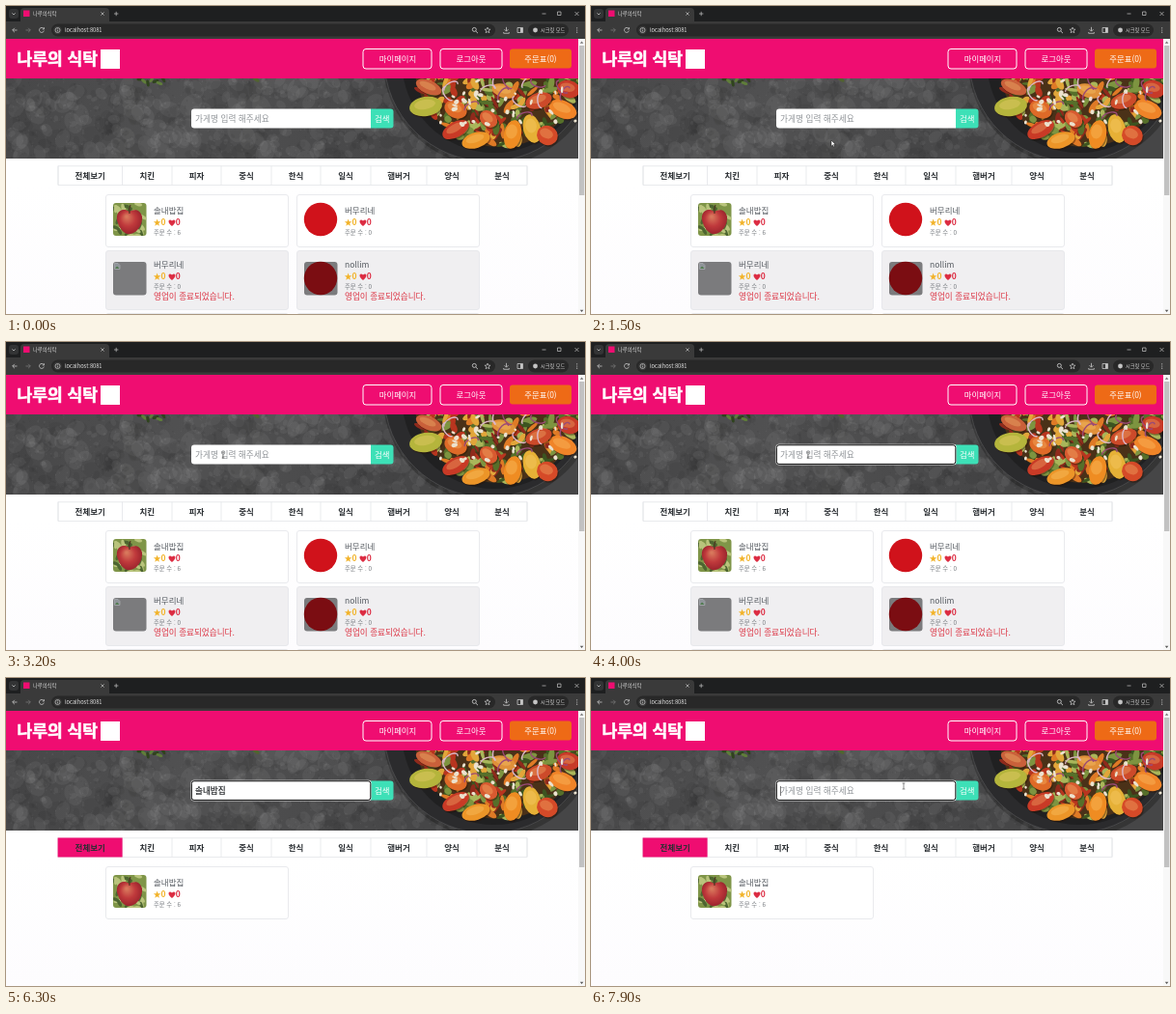
Animation, 600 px wide and 319 px high, one loop 8 s. Source, as an HTML page with a canvas:

```html
<!DOCTYPE html>
<html lang="ko">
<head>
<meta charset="utf-8">
<title>나루의식탁</title>
<style>
html, body { margin: 0; width: 100%; height: 100%; overflow: hidden; background: #fff; }
canvas, svg { position: absolute; left: 0; top: 0; width: 600px; height: 319px; }
text { font-family: "Noto Sans CJK KR", "Noto Sans CJK", "Noto Sans", sans-serif; white-space: pre; }
</style>
</head>
<body>
<canvas id="page"></canvas>
<svg id="over" viewBox="0 0 600 319"></svg>
<script>
const W = 600, H = 319, LOOP = 8000;
const PINK = '#ef0d71', LINE = '#e4e5e9';
const canvas = document.getElementById('page');
const svg = document.getElementById('over');
const c = canvas.getContext('2d');
const dpr = window.devicePixelRatio || 1;
canvas.width = W * dpr;
canvas.height = H * dpr;
c.scale(dpr, dpr);

// ---------- helpers ----------
function rect(x, y, w, h, fill) { c.fillStyle = fill; c.fillRect(x, y, w, h); }

function box(x, y, w, h, r, fill, stroke, lw = 1) {
  c.beginPath();
  c.roundRect(x, y, w, h, r);
  if (fill) { c.fillStyle = fill; c.fill(); }
  if (stroke) { c.strokeStyle = stroke; c.lineWidth = lw; c.stroke(); }
}

function oval(x, y, rx, ry, fill, turn = 0) {
  c.beginPath();
  c.ellipse(x, y, rx, ry, turn, 0, Math.PI * 2);
  c.fillStyle = fill;
  c.fill();
}

function path(d, stroke, lw = 1, fill) {
  const p = new Path2D(d);
  if (fill) { c.fillStyle = fill; c.fill(p); }
  if (stroke) { c.strokeStyle = stroke; c.lineWidth = lw; c.stroke(p); }
}

function clipped(x, y, w, h, r, paint) {
  c.save();
  c.beginPath();
  c.roundRect(x, y, w, h, r);
  c.clip();
  paint();
  c.restore();
}

function random(seed) {
  return () => (seed = (seed * 16807) % 2147483647) / 2147483647;
}

function add(tag, attrs, parent = svg) {
  const el = document.createElementNS('http://www.w3.org/2000/svg', tag);
  for (const k in attrs) el.setAttribute(k, attrs[k]);
  parent.appendChild(el);
  return el;
}

// cy is the middle of the line
function label(str, x, cy, size, fill, opt = {}, parent = svg) {
  const el = add('text', { x, y: cy + size * 0.36, 'font-size': size, fill, ...opt }, parent);
  el.textContent = str;
  return el;
}

const MID = { 'text-anchor': 'middle' };
const BOLD = { 'font-weight': 700 };
const show = (el, on) => el.setAttribute('visibility', on ? 'visible' : 'hidden');

// ---------- browser frame ----------
function drawBrowser() {
  const ink = '#c4c4c4';
  rect(0, 0, W, 17, '#1e1f20');
  rect(0, 16, W, 18, '#3a3a3a');
  box(15, 2, 92, 15, [4, 4, 0, 0], '#3a3a3a');
  box(3, 3, 10, 10, 3, '#333435');
  path('M6.4 7.4L8 9L9.6 7.4', ink, 0.8);
  rect(18, 4.5, 6.5, 6.5, PINK);
  path('M98.4 6.4L101.6 9.6M101.6 6.4L98.4 9.6M112 8H116.4M114.2 5.8V10.2', ink, 0.7);
  path('M555.5 8H559.5M589.5 6L593.5 10M593.5 6L589.5 10M571.5 6H575V9.5H571.5Z', ink, 0.7);

  path('M11.5 25H6.8M8.9 22.8L6.7 25L8.9 27.2', ink, 0.8);
  path('M20.5 25H25.2M23.1 22.8L25.3 25L23.1 27.2', '#777', 0.8);
  path('M39 23.4A2.5 2.5 0 1 0 39.4 25.6M39.5 22.2V24H37.7', ink, 0.8);
  box(47, 18.5, 460, 13, 6.5, '#282828');
  oval(53.5, 25, 4.2, 4.2, '#3a3a3a');
  c.beginPath();
  c.arc(53.5, 25, 2.5, 0, Math.PI * 2);
  c.strokeStyle = ink;
  c.lineWidth = 0.7;
  c.stroke();
  path('M53.5 24.6V26.4M53.5 23.4V24', ink, 0.7);
  path('M487.3 24.4A2 2 0 1 1 483.3 24.4A2 2 0 1 1 487.3 24.4M486.8 26L489 28.2', ink, 0.9);
  star(499, 25.2, 3.2, null, ink);
  path('M518.5 21.8V26M516.5 24.2L518.5 26.2L520.5 24.2M515.7 27V28.3H521.3V27', ink, 0.8);
  path('M530 22.5H535.5V27.5H530Z', ink, 0.8);
  rect(533, 22.5, 2.5, 5, ink);
  box(541, 18.5, 42, 13, 6.5, '#282828');
  oval(548.5, 25, 2.4, 2.4, ink);
  for (const y of [22.8, 25, 27.2]) oval(591.7, y, 0.6, 0.6, ink);
}

function star(x, y, r, fill, stroke) {
  c.beginPath();
  for (let i = 0; i < 10; i++) {
    const a = i * Math.PI / 5 - Math.PI / 2, q = i % 2 ? r * 0.42 : r;
    c.lineTo(x + q * Math.cos(a), y + q * Math.sin(a));
  }
  c.closePath();
  if (fill) { c.fillStyle = fill; c.fill(); }
  if (stroke) { c.strokeStyle = stroke; c.lineWidth = 0.7; c.stroke(); }
}

function heart(x, y) {
  path(`M${x} ${y + 3.4}C${x - 6} ${y - 0.6} ${x - 3} ${y - 5} ${x} ${y - 1.9}` +
       `C${x + 3} ${y - 5} ${x + 6} ${y - 0.6} ${x} ${y + 3.4}Z`, null, 0, '#dc2c42');
}

// ---------- page ----------
function drawHeader() {
  rect(0, 34, 593, 41, PINK);
  rect(98, 45, 20, 20, '#fff');
  box(370, 44.5, 71, 20.5, 3, null, '#fff', 1);
  box(450, 44.5, 64, 20.5, 3, null, '#fff', 1);
  box(522, 44.5, 64, 20, 3, '#ee6a16');
}

function drawHero() {
  const rnd = random(77);
  clipped(0, 75, 593, 83, 0, () => {
    const g = c.createLinearGradient(0, 75, 420, 158);
    g.addColorStop(0, '#474748');
    g.addColorStop(0.45, '#515152');
    g.addColorStop(1, '#464647');
    rect(0, 75, 593, 83, g);
    for (let i = 0; i < 1500; i++) {
      const tone = rnd() < 0.5 ? '255,255,255' : '0,0,0';
      const r = 0.6 + 9 * rnd() ** 6;
      oval(rnd() * 480, 75 + rnd() * 83, r * 1.4, r, `rgba(${tone},0.05)`, rnd() * 3);
    }
    for (let i = 0; i < 7; i++) {
      oval(139 + i * 4, 76 + (i % 3) * 2, 3.5, 1.6, i % 2 ? '#5f7d3a' : '#2f431d', i * 0.7);
    }
    oval(259, 76, 4, 1.8, '#506530', 0.6);
    drawPlate(rnd);
  });
}

function drawPlate(rnd) {
  oval(502, 58, 111, 108, 'rgba(0,0,0,0.25)');
  oval(500, 55, 108, 106, '#2b2b2d');
  c.strokeStyle = '#58585a';
  c.lineWidth = 0.6;
  c.stroke();
  oval(506, 56, 96, 96, '#202021');
  drawSalad(rnd);
}

function drawSalad(rnd) {
  const cx = 511, cy = 58, R = 88;
  oval(cx, cy, R, R, '#4a3118');
  const mix = ['#7d9440', '#b8351f', '#3c5420', '#df7a26', '#a9b65a', '#8f2a1c', '#e2a63a', '#566f2a'];
  for (let i = 0; i < 210; i++) {
    const a = rnd() * Math.PI, q = R * Math.sqrt(rnd());
    oval(cx + q * Math.cos(a), cy + q * Math.sin(a), 3 + rnd() * 6, 1.5 + rnd() * 2.5, mix[i % 8], rnd() * 3);
  }
  // x, y, half width, half height, turn, colour
  const fruit = [
    [435, 104, 17, 10, -0.15, '#b5b53c'], [438, 84, 14, 7, 0.4, '#c9603a'],
    [466, 107, 12, 9, 0.4, '#df6a28'], [466, 128, 15, 8, -0.5, '#c93a26'],
    [487, 139, 15, 8, -0.3, '#ec9528'], [500, 117, 10, 8, 0.7, '#d85a30'],
    [525, 133, 9, 15, 0.2, '#ef8c22'], [545, 127, 9, 15, -0.25, '#e6b036'],
    [561, 134, 11, 10, 0.4, '#d54a28'], [577, 107, 15, 9, 0.4, '#f08428'],
    [552, 98, 14, 8, -0.3, '#cd4a2a'], [516, 88, 13, 7, 0.3, '#e0903a'],
    [583, 86, 12, 9, 0.2, '#c73a28']
  ];
  for (const [x, y, a, b, turn, col] of fruit) {
    oval(x + 1, y + 1.5, a, b, 'rgba(40,15,0,0.4)', turn);
    oval(x, y, a, b, col, turn);
    oval(x - 1, y - b * 0.2, a * 0.65, b * 0.5, 'rgba(255,215,130,0.28)', turn);
  }
  for (let i = 0; i < 14; i++) {
    c.beginPath();
    c.ellipse(450 + rnd() * 138, 77 + rnd() * 38, 8, 4, rnd() * 3, 0, 3.6);
    c.strokeStyle = i % 2 ? '#9a4a76' : '#dcb6c8';
    c.lineWidth = 1.4;
    c.stroke();
  }
  for (let i = 0; i < 34; i++) {
    oval(445 + rnd() * 145, 76 + rnd() * 48, 1.2 + rnd() * 2.4, 1 + rnd() * 1.4, '#ece2cf', rnd() * 3);
  }
}

function drawSearch() {
  box(192, 106.5, 186, 20, [3, 0, 0, 3], '#fff');
  box(378, 106.5, 23.5, 20, [0, 3, 3, 0], '#3de0b7');
}

const tabEdges = [54, 120.5, 172, 223, 275, 326, 378, 436, 488, 540];

function drawTabs(active) {
  box(54, 165.75, 486, 19.75, 0, '#fff', LINE, 0.8);
  for (const x of tabEdges) rect(x - 0.4, 165.5, 0.8, 20, LINE);
  if (active) rect(53.6, 165.5, 67, 20, PINK);
}

function drawApple(x, y) {
  clipped(x, y, 34.5, 34, 3, () => {
    rect(x, y, 35, 34, '#7f9548');
    const rnd = random(9);
    for (let i = 0; i < 40; i++) {
      oval(x + rnd() * 34, y + rnd() * 34, 4, 1.8, i % 2 ? '#b9c47c' : '#4d6530', rnd() * 3);
    }
    const g = c.createRadialGradient(x + 14, y + 14, 1, x + 17, y + 19, 16);
    g.addColorStop(0, '#d8785c');
    g.addColorStop(0.45, '#c03a3c');
    g.addColorStop(1, '#8f1c28');
    path(`M${x + 17} ${y + 9}C${x + 8} ${y + 3} ${x + 1} ${y + 11} ${x + 5} ${y + 21}` +
         `C${x + 8} ${y + 29} ${x + 13} ${y + 33} ${x + 18} ${y + 32}` +
         `C${x + 25} ${y + 31} ${x + 31} ${y + 22} ${x + 30} ${y + 14}` +
         `C${x + 28} ${y + 6} ${x + 21} ${y + 6} ${x + 17} ${y + 9}Z`, null, 0, g);
    path(`M${x + 17} ${y + 11}Q${x + 16} ${y + 6} ${x + 18} ${y + 2}`, '#4b3420', 1.2);
  });
}

function drawCard(x, y, h, closed) {
  box(x + 0.5, y + 0.5, 189, h, 2.5, closed ? '#f0eff1' : '#fff', LINE, 0.8);
}

function drawRating(x, y) {
  star(x + 3.6, y, 3.9, '#f2b32a');
  heart(x + 19, y);
}

function drawPage(filtered) {
  rect(0, 0, W, H, '#fff');
  const g = c.createLinearGradient(0, 186, 0, H);
  g.addColorStop(0, '#fff');
  g.addColorStop(1, '#fdfcfe');
  rect(0, 186, 593, 133, g);
  drawBrowser();
  drawHeader();
  drawHero();
  drawSearch();
  drawTabs(filtered);

  drawCard(103, 195, 54);
  drawApple(111, 204);
  drawRating(153, 224.5);
  if (!filtered) {
    drawCard(301, 195, 54);
    oval(326, 221, 17.2, 17.2, '#d0121b');
    drawRating(351, 224.5);
    for (const x of [103, 301]) {
      drawCard(x, 253, 61, true);
      box(x + 8, 265, 34.5, 34.5, 3, '#7b7b7d');
      drawRating(x + 50, 280.5);
      drawCard(x, 318, 20, true);
    }
    path('M112.5 266.5H116L118 268.5V272.5H112.5Z', '#a9adb0', 0.7, '#8f9499');
    path('M113 272L115 269.5L117.5 272Z', null, 0, '#4f7a4c');
    oval(326, 282, 17.2, 17.2, '#7b0d12');
  }

  rect(593, 34, 7, 285, '#f8f8f8');
  rect(594, 41, 5.3, 155, '#c2c2c2');
  path('M594.8 38.7H598.4L596.6 36.5Z', null, 0, '#777');
  path('M594.8 314.8H598.4L596.6 317Z', null, 0, '#555');
}

// ---------- text ----------
const shop = '솔내밥집', other = '버무리네';

label('나루의식탁', 28, 8, 5.3, '#dadada');
label('localhost:8081', 61, 25, 5.7, '#e4e4e4');
label('시크릿 모드', 554, 25, 5.2, '#dedede');
label('나루의 식탁', 11.5, 54.5, 17.1, '#fff', { 'font-weight': 900, stroke: '#fff', 'stroke-width': 0.6 });
label('마이페이지', 406, 55, 8.4, '#fff', MID);
label('로그아웃', 482, 55, 8.4, '#fff', MID);
label('주문표(0)', 554, 55, 8.4, '#fff', MID);
label('검색', 389.8, 117, 8.4, '#fff', MID);

['전체보기', '치킨', '피자', '중식', '한식', '일식', '햄버거', '양식', '분식'].forEach((name, i) =>
  label(name, (tabEdges[i] + tabEdges[i + 1]) / 2, 175.8, 8.5, '#2b2f33', { ...MID, ...BOLD }));

const others = add('g', {});

function cardText(parent, x, y, name, orders, closed) {
  label(name, x, y, 8.5, '#555a60', {}, parent);
  label('0', x + 7.5, y + 12, 8.5, '#f2b32a', BOLD, parent);
  label('0', x + 22.7, y + 12, 8.5, '#dc2c42', BOLD, parent);
  label('주문 수 : ' + orders, x, y + 22.2, 6.3, '#74787d', {}, parent);
  if (closed) label('영업이 종료되었습니다.', x, y + 32.5, 8.6, '#dc3545', {}, parent);
}
cardText(svg, 153, 212.3, shop, 6);
cardText(others, 351, 212.3, other, 0);
cardText(others, 153, 268.3, other, 0, true);
cardText(others, 351, 268.3, 'nollim', 0, true);

// ---------- moving parts ----------
const ring = add('g', { fill: 'none' });
add('rect', { x: 191.6, y: 106, width: 187, height: 21.2, rx: 3, stroke: '#e6e6e6', 'stroke-width': 0.6 }, ring);
add('rect', { x: 192.4, y: 106.8, width: 185.4, height: 19.6, rx: 2.5, stroke: '#151515', 'stroke-width': 1 }, ring);
const hint = label('가게명 입력 해주세요', 196, 117, 8.7, '#8f9397');
const typed = label('', 196, 117, 8.6, '#1c1f22', { stroke: '#1c1f22', 'stroke-width': 0.2 });
const under = add('rect', { y: 121.6, width: 7.8, height: 0.9, fill: '#111' });
const caret = add('rect', { y: 112, width: 0.6, height: 10, fill: '#222' });
const arrow = add('path', { d: 'M0 0V6.2L1.5 4.9L2.5 7L3.5 6.5L2.6 4.5H4.4Z', fill: '#fff', stroke: '#111', 'stroke-width': 0.5 });
const beam = add('path', { d: 'M-1.4 -3H1.4M0 -3V3M-1.4 3H1.4', fill: 'none', stroke: '#444', 'stroke-width': 0.6 });

const FOCUS = 3400, TYPE = 4600, SEARCH = 6000, CLEAR = 7500;
const strokes = ['ㅅ', '소', '솔', '솔ㄴ', '솔내', '솔내ㅂ', '솔내바', '솔내밥', '솔내밥ㅈ', '솔내밥지', shop];
const keyTime = i => i < 6 ? TYPE + i * 168 : 5440 + (i - 5) * 70;

// time, x, y
const trail = [
  [1000, 268, 262], [1400, 249, 139], [1800, 249, 139], [2300, 260, 117], [2700, 260, 117],
  [3200, 225, 117], [4200, 225, 117], [4500, 224, 119], [7300, 224, 119], [7800, 324, 112], [8000, 324, 112]
];

function pointer(t) {
  let i = 1;
  while (i < trail.length - 1 && t > trail[i][0]) i++;
  const [t0, x0, y0] = trail[i - 1], [t1, x1, y1] = trail[i];
  let p = Math.min(1, Math.max(0, (t - t0) / (t1 - t0)));
  p = p * p * (3 - 2 * p);
  return [x0 + (x1 - x0) * p, y0 + (y1 - y0) * p];
}

let lastFiltered = null;

function render(t) {
  const filtered = t >= SEARCH;
  if (filtered !== lastFiltered) {
    drawPage(filtered);
    show(others, !filtered);
    lastFiltered = filtered;
  }

  let n = -1;
  if (t < CLEAR) while (n < strokes.length - 1 && t >= keyTime(n + 1)) n++;
  const str = n < 0 ? '' : strokes[n];
  const end = 196 + str.length * 7.91;
  typed.textContent = str;
  show(hint, !str);
  show(ring, t >= FOCUS);
  show(under, str && t < SEARCH);
  under.setAttribute('x', end - 7.9);

  const since = t >= CLEAR ? CLEAR : n >= 0 ? keyTime(n) : FOCUS;
  show(caret, t >= FOCUS && (t - since) % 1000 < 500);
  caret.setAttribute('x', end);

  const [x, y] = pointer(t);
  const visible = t >= 1000 && (t < 5600 || t >= 7300);
  const inField = x > 192 && x < 378 && y > 106 && y < 127;
  show(arrow, visible && !inField);
  show(beam, visible && inField);
  for (const el of [arrow, beam]) el.setAttribute('transform', `translate(${x} ${y})`);
}

const start = performance.now();
function tick() {
  const t = (performance.now() - start) % LOOP;
  render(Math.floor(t / 100) * 100);
  requestAnimationFrame(tick);
}
tick();
</script>
</body>
</html>
```
